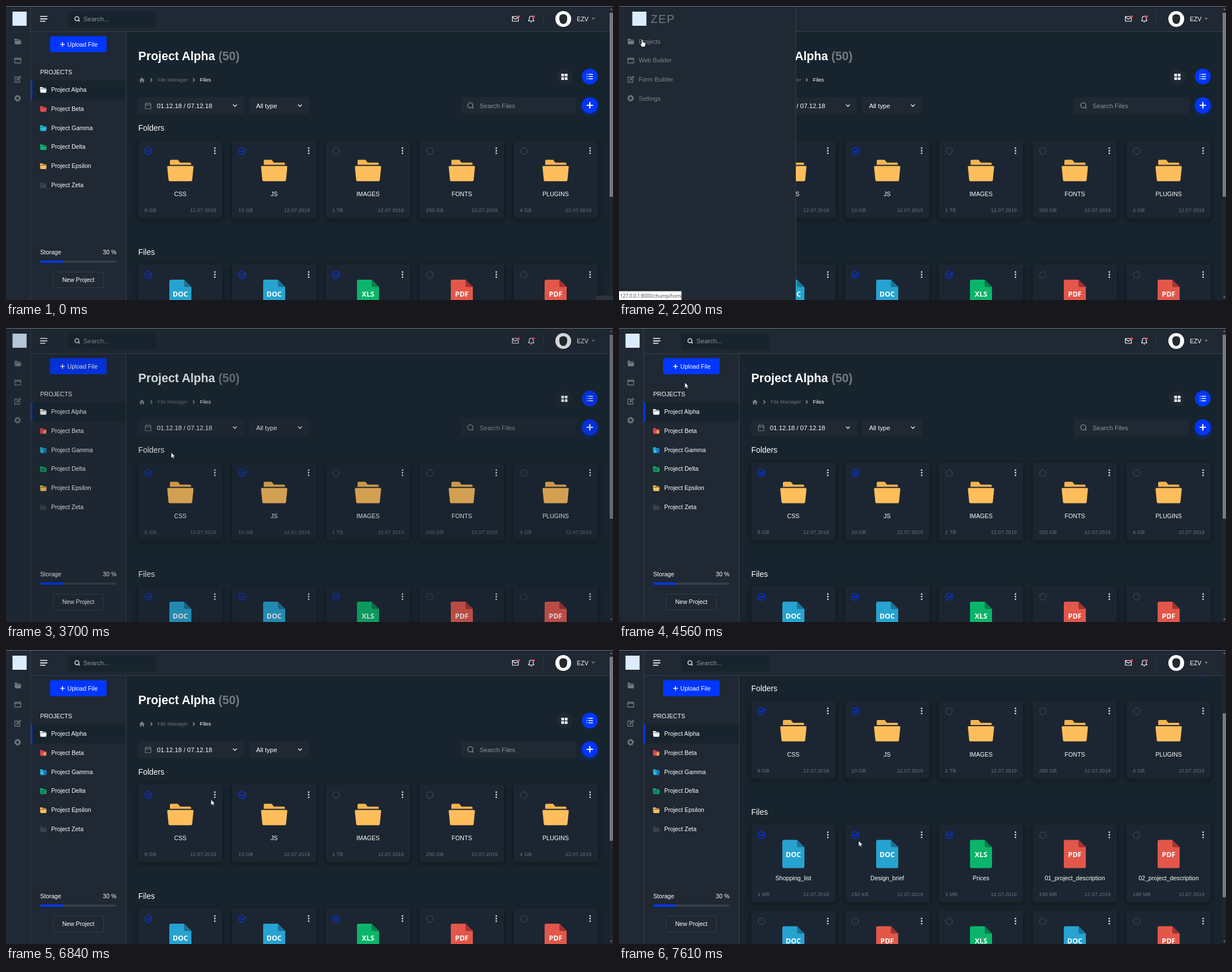
Recreate the animation shown at these times as an HTML page. Size 1074 px wide and 521 px high, loop 7990 ms.

```html
<!DOCTYPE html>
<html lang="en">
<head>
<meta charset="utf-8">
<title>File manager</title>
<style>
  html, body { margin: 0; width: 100%; height: 100%; overflow: hidden; background: #17242d; }
  svg { display: block; width: 1074px; height: 521px; }
  text { font-family: "Liberation Sans", Arial, sans-serif; white-space: pre; }
  .badge { font-family: "Open Sans", sans-serif; font-weight: 700; }
  .status { font-family: "Open Sans", sans-serif; }
</style>
</head>
<body>
<svg id="stage" viewBox="0 0 1074 521" xmlns="http://www.w3.org/2000/svg"></svg>
<script>
const LOOP = 7990;
const BG = '#17242d', PANEL = '#1f2833', LINE = '#35404a', BLUE = '#0036ff';
const GREY = '#69727a', WHITE = '#fff', AMBER = '#ffbe5c';

// ---- drawing helpers ----
const rect = (x, y, w, h, fill, r = 0, more = '') =>
  `<rect x="${x}" y="${y}" width="${w}" height="${h}" rx="${r}" fill="${fill}" ${more}/>`;
const circle = (x, y, r, fill, more = '') =>
  `<circle cx="${x}" cy="${y}" r="${r}" fill="${fill}" ${more}/>`;
const shape = (d, fill, more = '') => `<path d="${d}" fill="${fill}" ${more}/>`;
const line = (d, color, w = 1.2) =>
  `<path d="${d}" fill="none" stroke="${color}" stroke-width="${w}" stroke-linecap="round" stroke-linejoin="round"/>`;
const text = (x, y, s, size, fill = WHITE, more = '') =>
  `<text x="${x}" y="${y}" font-size="${size}" fill="${fill}" ${more}>${s}</text>`;
const group = (x, y, body, more = '') => `<g transform="translate(${x} ${y})" ${more}>${body}</g>`;
const MIDDLE = 'text-anchor="middle"', END = 'text-anchor="end"', BOLD = 'font-weight="700"';

const chevronDown = (x, y) => line(`M${x - 3} ${y - 1.5}l3 3l3 -3`, WHITE);
const chevronRight = (x, y) => line(`M${x - 1.5} ${y - 2.5}l2.5 2.5l-2.5 2.5`, '#a5adb3', 1.1);
const lens = (x, y, r, color) =>
  line(`M${x - r} ${y}a${r} ${r} 0 1 0 ${2 * r} 0a${r} ${r} 0 1 0 ${-2 * r} 0M${x + r * .7} ${y + r * .7}l2 2`, color, 1.3);
const plus = (x, y, r, w) => line(`M${x - r} ${y}h${2 * r}M${x} ${y - r}v${2 * r}`, WHITE, w);

// Small open folder, 12 by 10.
const smallFolder = color =>
  shape('M1 0h3.6l1.3 1.5h4.3q.8 0 .8 .8v.5h-11v-2q0 -.8 1 -.8z', color) +
  shape('M0 3.4h12l-.9 5.8q-.1 .8-1 .8h-8.2q-.9 0-1-.8z', color);

const bigFolder =
  shape('M5 9V2.2Q5 0 7.2 0H19l4 5h17.500q2 0 2 2v2z', '#f7b450') +
  shape('M2 11h43q2 0 1.700 2l-2.300 23q-.2 2-2.200 2h-37.400q-2 0-2.200-2l-2.300-23q-.2-2 1.700-2z', AMBER);

const FILE_COLORS = { DOC: ['#26a3d1', '#1c7396'], XLS: ['#0ab56a', '#087d4b'], PDF: ['#e2574a', '#a33330'] };
const fileIcon = kind => {
  const [main, fold] = FILE_COLORS[kind];
  return shape('M3 0h23l13 13v34q0 3-3 3h-33q-3 0-3-3v-44q0-3 3-3z', main) +
    shape('M26 0l13 13h-10.500q-2.500 0-2.500-2.500z', fold) +
    text(19.5, 30, kind, 12.400, WHITE, `class="badge" ${MIDDLE}`);
};

const card = (x, y, icon, label, size, checked) => group(x, y,
  rect(0, 0, 149, 136.5, PANEL, 4, 'filter="url(#shade)"') +
  (checked
    ? line('M23.600 16.500a6 6 0 1 1-3.200-3.600M15.400 17.600l2.600 2.700l6-6.300', BLUE, 1.300)
    : circle(18, 18.5, 5.800, 'none', 'stroke="#47515b"')) +
  [13.400, 18, 22.600].map(v => circle(135.500, v, 1.400, '#dfe3e6')).join('') +
  icon +
  text(74.500, 98.500, label, 10.600, WHITE, MIDDLE) +
  text(11, 126.500, size, 9.250, GREY) +
  text(138, 126.500, '12.07.2019', 9.250, GREY, END));

const cardRow = (y, items, iconOf) =>
  items.map(([label, size, checked, kind], i) => card(234 + 166 * i, y, iconOf(kind), label, size, checked)).join('');

// ---- page parts ----
function content() {
  const folders = [['CSS', '8 GB', 1], ['JS', '10 GB', 1], ['IMAGES', '1 TB'], ['FONTS', '250 GB'], ['PLUGINS', '4 GB']];
  const files = [['Shopping_list', '1 MB', 1, 'DOC'], ['Design_brief', '150 KB', 1, 'DOC'], ['Prices', '1 MB', 1, 'XLS'],
    ['01_project_description', '150 MB', 0, 'PDF'], ['02_project_description', '160 MB', 0, 'PDF']];
  const more = ['DOC', 'PDF', 'XLS', 'DOC', 'PDF'].map(kind => ['', '', 0, kind]);
  const folderIcon = () => group(51, 34, bigFolder);
  const docIcon = kind => group(55, 27, fileIcon(kind));
  return text(234, 96, 'Project Alpha <tspan fill="#707a82">(50)</tspan>', 21.200, WHITE, BOLD) +
    shape('M235.500 131.500l5-5l5 5h-1.500v4h-2.500v-3h-2v3h-2.500v-4z', '#79828a') +
    chevronRight(257.500, 131) + text(268, 134.200, 'File Manager', 9.250, GREY) +
    chevronRight(332.500, 131) + text(343, 134.200, 'Files', 9.300) +
    circle(988, 125, 14, PANEL) +
    [[982.500, 120], [988.700, 120], [982.500, 126.200], [988.700, 126.200]].map(([x, y]) => rect(x, y, 4.800, 4.800, WHITE, .5)).join('') +
    circle(1033, 125, 14, BLUE) +
    [121, 125, 129].map(y => line(`M1028 ${y}h.3M1031 ${y}h7`, WHITE, 1.500)).join('') +
    circle(1033, 176, 14, BLUE, 'filter="url(#glow)"') + plus(1033, 176, 4.800, 2.200) +
    rect(234, 161.500, 187, 30, PANEL, 3) +
    line('M246.500 173h10v9h-10zM246.500 175.500h10M249 171v2M254 171v2', '#79828a', 1.100) +
    text(267, 180.500, '01.12.18 / 07.12.18', 11.350) + chevronDown(405, 176.500) +
    rect(430, 161.500, 106, 30, PANEL, 3) + text(442.500, 180.500, 'All type', 11.350) + chevronDown(520, 176.500) +
    rect(805, 161.500, 204, 30, PANEL, 3) + lens(821.500, 176, 4.600, '#8c959c') +
    text(838, 180.500, 'Search Files', 11.350, '#8c959c') +
    text(234, 221, 'Folders', 13.900) + cardRow(238.500, folders, folderIcon) +
    text(234, 440.500, 'Files', 13.900) + cardRow(458, files, docIcon) + cardRow(611, more, docIcon);
}

function projects() {
  const rows = [['Alpha', WHITE], ['Beta', '#ef4655'], ['Gamma', '#24bfe0'], ['Delta', '#0fb46b'], ['Epsilon', AMBER], ['Zeta', '#39434d']];
  const accents = rect(66.500, 181, 4.500, 6, '#f0a04b') + rect(66.500, 215, 4.500, 6, '#1769e0') + rect(62, 248.500, 7, 5.500, '#0b7f58');
  return rect(44, 46, 168, 475, PANEL) + rect(212, 46, 1, 475, LINE) +
    rect(78, 53.500, 100, 28.500, BLUE, 3) + plus(100, 68, 3.400, 1.500) + text(108.500, 71.700, 'Upload File', 10.600) +
    text(60.500, 121, 'PROJECTS', 10.600) +
    rect(44, 132, 168, 33.500, BG) + rect(44, 132, 2.500, 33.500, BLUE) +
    rows.map(([name, color], i) => {
      const y = 148.300 + 33.800 * i;
      return group(60, y - 4.500, smallFolder(color)) + text(80, y + 3.700, 'Project ' + name, 10.600);
    }).join('') + `<g id="accents">${accents}</g>` +
    text(60.500, 440, 'Storage', 10.600) + text(195.500, 440, '30 %', 10.600, WHITE, END) +
    rect(61, 451, 134.500, 4, '#343e49', 1) + rect(61, 451, 40, 4, BLUE, 1) +
    rect(83.500, 471.500, 89, 28, 'none', 2, 'stroke="#343e49"') + text(128, 489.200, 'New Project', 10.600, WHITE, MIDDLE);
}

function header() {
  return rect(44, 1, 1024, 45, PANEL) + rect(44, 45, 1024, 1, LINE) +
    line('M61 18.500h11.500M61 22.800h11.500M61 27h8', WHITE, 1.700) +
    rect(110, 9, 156, 29, BG, 3) + lens(125.500, 22.500, 3.600, WHITE) + text(137, 26.800, 'Search...', 11.350, '#8c959c') +
    line('M896 18.500h10.500v8.500h-10.500zM896 19.500l5.250 4l5.250-4', WHITE) + circle(907, 18.800, 2.300, '#f44450') +
    line('M924.500 26.500q1.500-1.500 1.500-5q0-3.500 3.300-3.500t3.300 3.500q0 3.500 1.500 5zM928.300 28.500h2', WHITE) + circle(933.500, 18.800, 2.300, '#f44450') +
    rect(950, 12, 1, 22, '#2e3843') +
    circle(986, 23, 14, WHITE) + shape('M979 21q0-6.500 7-6.500t7 6.500q0 11-7 11t-7-11z', '#252a2e') +
    text(1010, 26.700, 'EZV', 10.600) + shape('M1036 21h6l-3 3.300z', '#79828a');
}

function sidebar() {
  const tint = '#717a82';
  const items = ['Projects', 'Web Builder', 'Form Builder', 'Settings'];
  const icons = group(15, 58, smallFolder(tint)) +
    line('M15.500 92.500h10.500v8.500h-10.500zM15.500 94.500h10.500', tint, 1.300) +
    line('M21 126h-5.500v9h9v-5M19 131.800l.5-2l5.300-5.300l1.400 1.400l-5.300 5.300z', tint, 1.300) +
    circle(20.500, 163.500, 3.600, 'none', `stroke="${tint}" stroke-width="2.400"`) +
    circle(20.500, 163.500, 5.300, 'none', `stroke="${tint}" stroke-width="1.300" stroke-dasharray="2.100 2.063"`);
  return rect(0, 1, 320, 520, PANEL) + icons +
    `<g id="brand">${rect(11.500, 10, 25, 25, '#dcecff')}<g class="wide">${text(44, 30, 'ZEP', 20, tint, 'letter-spacing="1.500"')}</g></g>` +
    `<g class="wide">${items.map((s, i) => text(35, 66.500 + 33.700 * i, s, 10.700, '#7d868e')).join('')}</g>` +
    `<g id="track">${rect(1, 515, 80, 3.500, '#303a45', 1.500)}</g>`;
}

const stage = document.getElementById('stage');
stage.innerHTML = `
  <defs>
    <filter id="shade" x="-15%" y="-15%" width="130%" height="135%"><feDropShadow dx="0" dy="3" stdDeviation="5" flood-color="#0a1218" flood-opacity=".55"/></filter>
    <filter id="glow" x="-60%" y="-60%" width="220%" height="220%"><feDropShadow dx="0" dy="3" stdDeviation="4" flood-color="${BLUE}" flood-opacity=".45"/></filter>
    <clipPath id="view"><rect x="213" y="46" width="855" height="475"/></clipPath>
    <clipPath id="drawer"><rect id="mask" x="0" y="1" width="44" height="520"/></clipPath>
  </defs>
  ${rect(0, 0, 1074, 521, BG)}
  <g id="page">
    <g clip-path="url(#view)"><g id="scroll">${content()}</g></g>
    ${projects()}${header()}
    <g clip-path="url(#drawer)">${sidebar()}</g>
    <rect id="edge" x="43" y="1" width="1" height="520" fill="${LINE}"/>
    ${rect(1068, 1, 6, 520, '#20262b')}
    ${shape('M1069 7l2-3l2 3zM1069 515l2 3l2-3z', '#7b7f82')}
    <rect id="thumb" x="1068" y="12" width="6" height="326" fill="#777a7c"/>
    <g id="corner">${rect(1044, 513, 30, 8, '#2a343e')}</g>
  </g>
  ${rect(0, 0, 1074, 1, '#6f777d')}
  <g id="status">${rect(-1, 505.500, 111.500, 17, '#fdfdfd', 0, 'stroke="#9aa0a4"')}${text(2, 517, '127.0.0.1:8000/chump/home', 8.300, '#4a4a4a', 'class="status"')}</g>
  <g id="cursor" stroke="#10161b" stroke-width=".7" stroke-linejoin="round">
    ${shape('M0 0V10L2.300 8L4 11.300L5.600 10.600L4.100 7.300H7.200Z', WHITE, 'id="arrow"')}
    ${shape('M-1.200 1Q0-.7 1.200 1V5L5 5.900Q6.500 6.300 6.100 8L5 13.300H-.8L-3.700 8.600Q-3.500 7-1.200 8.500Z', WHITE, 'id="hand"')}
  </g>`;

// ---- motion ----
const PATH = [[600, 925, 515], [720, 800, 450], [860, 500, 310], [1000, 270, 205], [1160, 110, 140], [1370, 37, 98],
  [1500, 27, 65], [2000, 38, 62], [2200, 41, 59], [3220, 41, 59], [3450, 120, 120], [3800, 360, 260], [4010, 400, 285],
  [4070, 400, 280], [4300, 220, 150], [4500, 117, 97], [4600, 116, 96], [4740, 108, 99], [5300, 108, 99], [5500, 66, 138],
  [5750, 100, 157], [5930, 160, 152], [6070, 121, 156], [6140, 121, 152], [6190, 121, 148], [6330, 121, 148],
  [6520, 190, 84], [6800, 350, 250], [7040, 424, 338]];
const SCROLL = [[7230, 0], [7290, 6], [7360, 23], [7420, 58], [7480, 98], [7545, 132], [7610, 148.5]];
const FADE = [[2250, 1], [2590, 0], [3180, 0], [3820, 1]];

const clamp = v => Math.min(1, Math.max(0, v));
const smooth = v => v * v * (3 - 2 * v);
const within = (t, a, b) => t >= a && t < b;

function sample(track, t, k = 1) {
  if (t <= track[0][0]) return track[0][k];
  const i = track.findIndex(p => p[0] > t);
  if (i < 0) return track[track.length - 1][k];
  const a = track[i - 1], b = track[i];
  return a[k] + (b[k] - a[k]) * (t - a[0]) / (b[0] - a[0]);
}

const el = id => document.getElementById(id);
const show = (node, on) => { node.style.display = on ? '' : 'none'; };
const move = (id, x, y) => el(id).setAttribute('transform', `translate(${x} ${y})`);
const wide = document.querySelectorAll('.wide');

function draw(t) {
  const open = t < 2900 ? smooth(clamp((t - 1393) / 410)) : 0;
  const width = 44 + 269 * open;
  el('mask').setAttribute('width', width);
  el('edge').setAttribute('x', width - 1);
  wide.forEach(node => show(node, open > .03));
  show(el('track'), open > .03 && open < .6);
  move('brand', 12 * open, 0);

  const top = sample(SCROLL, t);
  move('scroll', 0, -top);
  el('thumb').setAttribute('y', 12 + top * .674);
  el('page').setAttribute('opacity', sample(FADE, t));
  show(el('accents'), t > 3180);
  show(el('corner'), t < 60);
  show(el('status'), within(t, 1620, 3400));

  const x = sample(PATH, t, 1), y = sample(PATH, t, 2);
  const hand = within(t, 1430, 3280) || (within(t, 5300, 6600) && y > 132 && y < 166 && x < 212);
  move('cursor', x, y);
  show(el('cursor'), t >= 600 && !within(t, 4960, 5300));
  show(el('hand'), hand);
  show(el('arrow'), !hand);
}

const start = performance.now();
function tick() {
  draw((performance.now() - start) % LOOP);
  requestAnimationFrame(tick);
}
tick();
</script>
</body>
</html>
```
